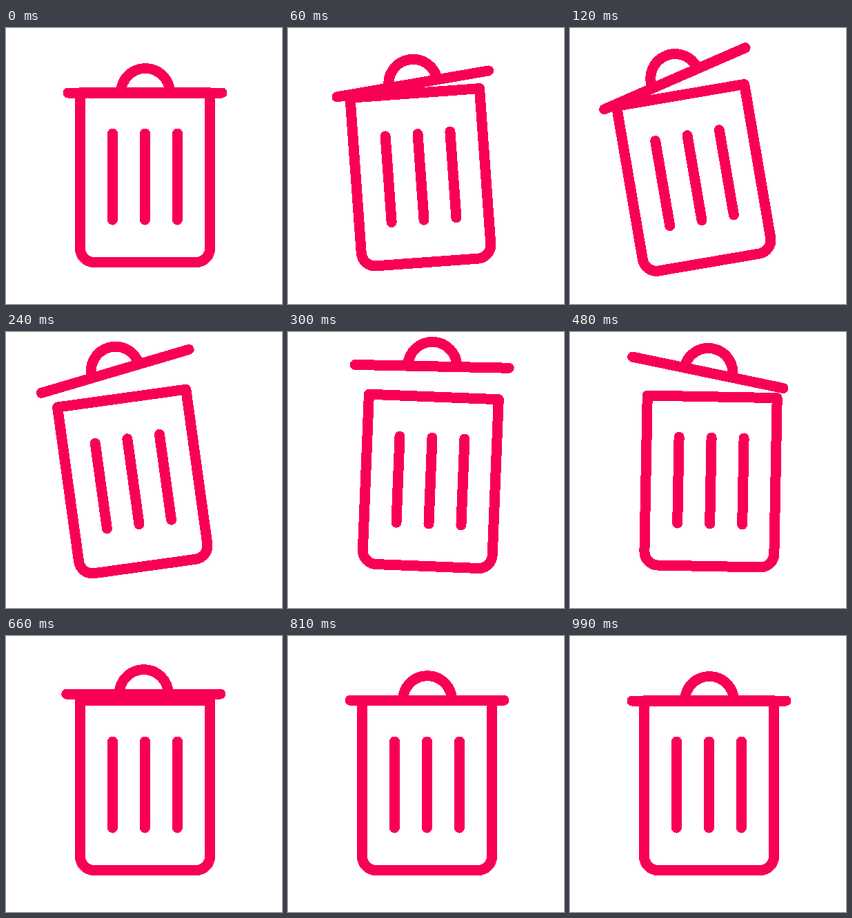
Write an HTML page that moves like this. It is 400x400 px and loops after 3.02 s.

```html
<!DOCTYPE html>
<html lang="en">
<head>
<meta charset="utf-8">
<title>Trash can</title>
<style>
html, body { margin: 0; height: 100%; overflow: hidden; background: #fff; }
svg { display: block; width: 100%; height: 100%; }
</style>
</head>
<body>
<svg viewBox="0 0 400 400" fill="none" stroke="#f80056" stroke-width="15"
     stroke-linecap="round" stroke-linejoin="round" shape-rendering="crispEdges">
  <g id="can">
    <path d="M107.5 93.8V319.5a20 20 0 0 0 20 20H275.5a20 20 0 0 0 20-20V93.8z"/>
    <path d="M154.5 153V278M201.5 153V278M248.5 153V278"/>
    <g id="lid">
      <path d="M-111.5 0H111.5"/>
      <path d="M-35 0a35.5 35.5 0 0 1 71 0"/>
    </g>
  </g>
</svg>
<script>
const LOOP = 3020, STEP = 30, END = 990;

const swing = u => (1 - Math.cos(Math.PI * u)) / 2;
const rise = u => 1 - (1 - u) ** 2;
const settle = u => 1 - (1 - u ** 1.8) ** 5;

// Value at time t when easing from a to b between the times t0 and t1.
const tween = (t, t0, t1, a, b, ease = swing) =>
  a + (b - a) * ease(Math.min(Math.max((t - t0) / (t1 - t0), 0), 1));

const can = document.getElementById("can");
const lid = document.getElementById("lid");

function pose(t) {
  // The can leans left, swings over to the right and comes upright.
  const lean = tween(t, 0, 135, 0, -10) + tween(t, 210, 330, 0, 14.4) + tween(t, 330, 555, 0, -4.4);
  // The lid flies off and settles, moving relative to the can.
  const tilt = tween(t, 0, 140, 0, -14.6) + tween(t, 140, 450, 0, 25.8) + tween(t, 450, 660, 0, -11.2);
  const drift = tween(t, 0, 120, 0, -4) + tween(t, 240, 500, 0, -3) + tween(t, 500, 760, 0, 7);
  const lift = tween(t, 0, 360, 0, 45.5, rise) + tween(t, 360, END, 0, -45.5, settle);

  can.setAttribute("transform", `rotate(${lean} 201.5 340)`);
  lid.setAttribute("transform", `translate(${201.5 + drift} ${94 - lift}) rotate(${tilt})`);
}

function draw() {
  const now = performance.now() % LOOP;
  pose(Math.min(Math.floor(now / STEP) * STEP, END));
  requestAnimationFrame(draw);
}
draw();
</script>
</body>
</html>
```
